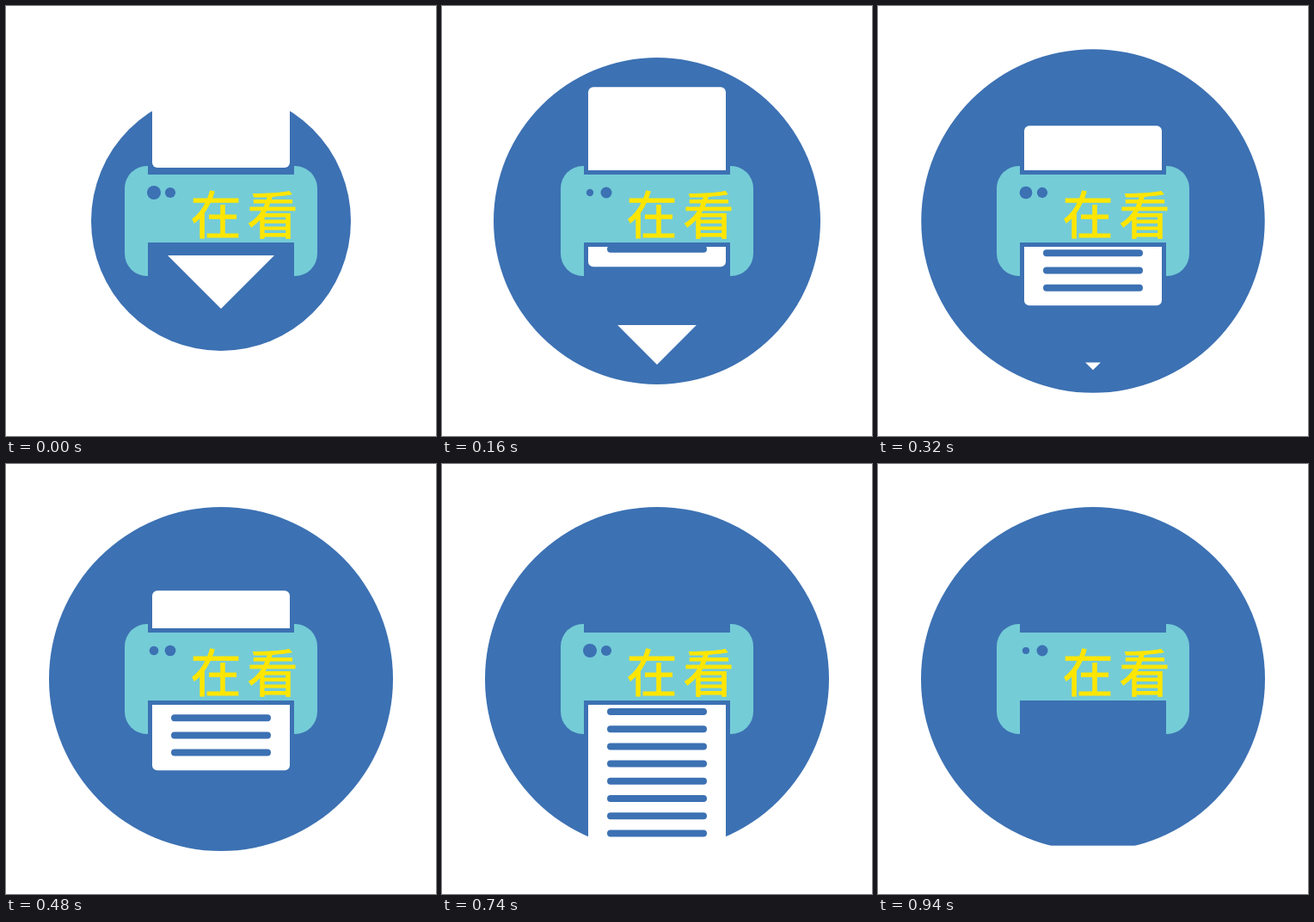
These frames come from a looping animation (500x500 px, 0.96 s). An HTML page with a canvas:

```html
<!DOCTYPE html>
<html lang="zh">
<head>
<meta charset="utf-8">
<style>
  html, body { margin: 0; height: 100%; overflow: hidden; background: #fff; }
  canvas { display: block; }
</style>
</head>
<body>
<canvas id="stage" width="500" height="500"></canvas>
<script>
const ctx = document.getElementById('stage').getContext('2d');
const BLUE = '#3c71b3', CYAN = '#74ccd7', YELLOW = '#ffe600', WHITE = '#fff';
const LOOP = 960, STEP = 20;
const PAPER_HEIGHT = 209, LINE_COUNT = 9, LINE_GAP = 20.2;

const progress = (t, duration) => Math.min(1, Math.max(0, t / duration));
const cubicOut = u => 1 - (1 - u) ** 3;
const quadInOut = u => u < 0.5 ? 2 * u * u : 1 - 2 * (1 - u) ** 2;
const mix = (a, b, u) => a + (b - a) * u;

function box(x, y, w, h, radius, color) {
  ctx.fillStyle = color;
  ctx.beginPath();
  ctx.roundRect(x, y, w, h, radius);
  ctx.fill();
}

function disc(x, y, r, color) {
  ctx.fillStyle = color;
  ctx.beginPath();
  ctx.arc(x, y, r, 0, 2 * Math.PI);
  ctx.fill();
}

function clipBox(x, y, w, h) {
  ctx.beginPath();
  ctx.rect(x, y, w, h);
  ctx.clip();
}

// The sheet is visible above the feed slot and below the output slot.
function drawPaper(bottom, radius) {
  for (const [y, h] of [[0, 191], [280, 220]]) {
    ctx.save();
    clipBox(0, y, 500, h);
    box(170, bottom - PAPER_HEIGHT, 160, PAPER_HEIGHT, 6, WHITE);
    ctx.restore();
  }
  ctx.save();
  clipBox(0, 280, 500, 220);
  ctx.beginPath();
  ctx.arc(250, 250, radius, 0, 2 * Math.PI);
  ctx.clip();
  for (let i = 0; i < LINE_COUNT; i++) {
    box(192, bottom - 24.6 - i * LINE_GAP, 116, 8, 4, BLUE);
  }
  ctx.restore();
}

function drawArrow(t) {
  const half = 62 * (1 - quadInOut(progress(t - 5, 430)));
  if (half <= 0) return;
  const y = mix(321, 421.5, cubicOut(progress(t, 456)));
  ctx.fillStyle = WHITE;
  ctx.beginPath();
  ctx.moveTo(250 - half, y - half / 2);
  ctx.lineTo(250 + half, y - half / 2);
  ctx.lineTo(250, y + half / 2);
  ctx.fill();
}

function drawPrinter(t) {
  box(138, 186, 27, 128, [26, 0, 0, 26], CYAN);
  box(335, 186, 27, 128, [0, 26, 26, 0], CYAN);
  box(164, 196, 172, 79, 0, CYAN);

  const pulse = Math.cos(2 * Math.PI * t / 368);
  disc(172, 217, 6 + 2 * pulse, BLUE);
  disc(191, 217, 6.3 - 0.2 * pulse, BLUE);

  ctx.font = '59px "Noto Sans CJK SC", "Noto Sans CJK", sans-serif';
  ctx.textAlign = 'center';
  ctx.fillStyle = ctx.strokeStyle = YELLOW;
  [...'在看'].forEach((char, i) => {
    ctx.fillText(char, 244 + 66 * i, 265);
    ctx.strokeText(char, 244 + 66 * i, 265);
  });
}

function draw(now) {
  const t = Math.floor(now % LOOP / STEP) * STEP;
  const radius = mix(151, 200, cubicOut(progress(t, 389)));
  const bottom = mix(188, 356.2, cubicOut(progress(t, 500)))
    + 0.00142 * Math.max(0, t - 483) ** 2;

  ctx.fillStyle = WHITE;
  ctx.fillRect(0, 0, 500, 500);
  disc(250, 250, radius, BLUE);
  drawPaper(bottom, radius);
  drawArrow(t);
  drawPrinter(t);
}

const start = performance.now();
function tick() {
  draw(performance.now() - start);
  requestAnimationFrame(tick);
}
tick();
</script>
</body>
</html>
```
